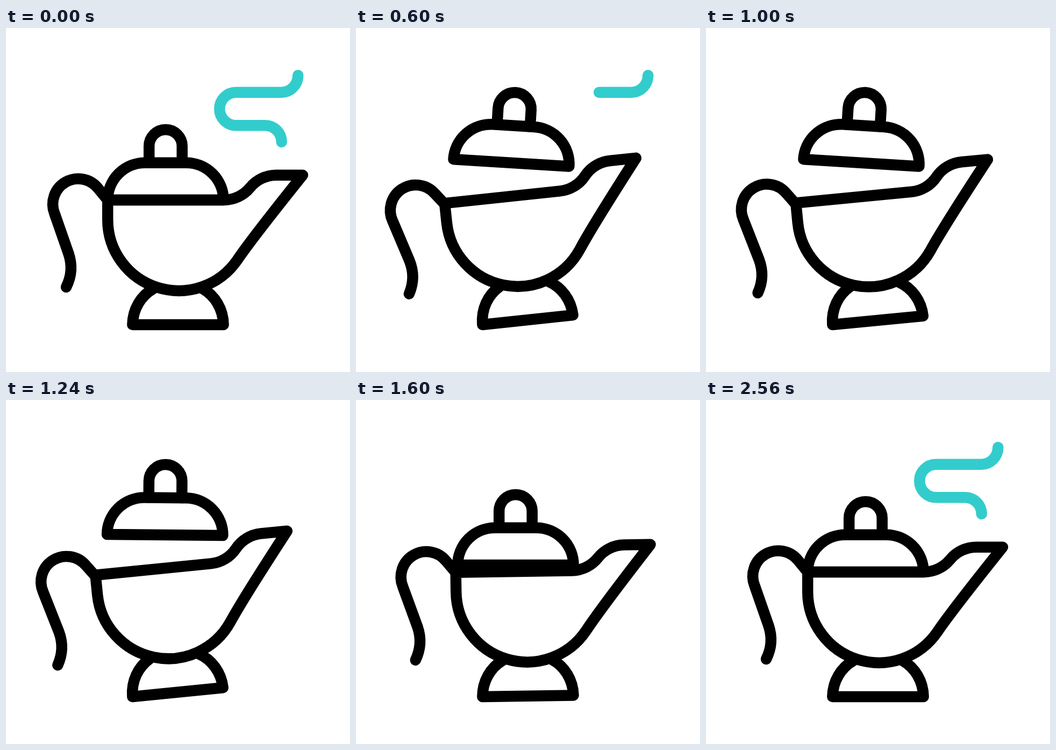
Write an HTML page with a canvas that moves like this. It is 640 by 640 pixels and loops after 3 s.

```html
<!DOCTYPE html>
<html lang="en">
<head>
<meta charset="utf-8">
<title>Lamp</title>
<style>
  html, body { margin: 0; width: 100%; height: 100%; overflow: hidden; background: #fff; }
  canvas { display: block; width: 640px; height: 640px; }
</style>
</head>
<body>
<canvas id="stage" width="640" height="640"></canvas>
<script>
const ctx = document.getElementById('stage').getContext('2d');
const LOOP = 3000, STEP = 40;
const INK = '#000', TEAL = '#33cccc';

const body = new Path2D(
  'M189.2 320 V357 A132.2 132.2 0 0 0 430 432 C447 407 482 361 552 273.7 ' +
  'H503 A63.3 63.3 0 0 0 454 297 A63.3 63.3 0 0 1 405 320 Z');
const foot = new Path2D('M274 485 C251 498 236 523 235.3 552 H404.6 C404 523 389 498 366 485');
const handle = new Path2D(
  'M189.2 320 L171.5 298.5 A47.3 47.3 0 0 0 90.3 345 L116.5 420 C123.5 441 121.5 463 112 482');
const lid = new Path2D(
  'M189.2 320 A69.3 69.3 0 0 1 258.5 250.7 H335.3 A69.3 69.3 0 0 1 404.6 320 Z');
const knob = new Path2D('M266.2 250.7 V219.7 A30.75 30.75 0 0 1 327.7 219.7 V250.7');
const smoke = new Path2D(
  'M512.7 212 A30.75 30.75 0 0 0 482 181.2 H428 A30.75 30.75 0 0 1 428 119.7 ' +
  'H512.5 A30.75 31.7 0 0 0 543.3 88');
const SMOKE_LENGTH = 332.6;

const clamp = (v, low, high) => Math.min(high, Math.max(low, v));
const progress = (t, from, to) => clamp((t - from) / (to - from), 0, 1);

// Eased 0 to 1 between two times.
function ramp(t, from, to) {
  const u = progress(t, from, to);
  return u * u * (3 - 2 * u);
}

// Up at one time, back down later.
const plateau = (t, up, top, fall, end) => ramp(t, up, top) - ramp(t, fall, end);
const hop = (t, from, to) => Math.sin(Math.PI * progress(t, from, to));

function potTilt(t) {
  const shake = 1 - Math.cos(Math.PI * (clamp(t, 720, 1040) - 720) / 80);
  return 7 * plateau(t, 200, 720, 1040, 1760) - 1.5 * shake;
}

const handleSway = t => 3.4 * plateau(t, 400, 720, 1240, 1640);

function lidTilt(t) {
  const swing = Math.cos(Math.PI * (clamp(t, 560, 1040) - 560) / 120);
  return 7 * swing * plateau(t, 440, 560, 1040, 1280);
}

function lidLift(t) {
  return 68.9 * plateau(t, 120, 430, 1240, 1480) + 13 * hop(t, 1480, 1720) + 8.6 * hop(t, 1720, 2080);
}

const smokeTail = t => ramp(t, 280, 800);
const smokeHead = t =>
  0.95 * ramp(t, 1760, 2030) - 0.095 * ramp(t, 2030, 2360) + 0.145 * ramp(t, 2360, 2560);

function turned(x, y, degrees, paint) {
  ctx.save();
  ctx.translate(x, y);
  ctx.rotate(degrees * Math.PI / 180);
  ctx.translate(-x, -y);
  paint();
  ctx.restore();
}

function drawPot(t) {
  turned(235.3, 552, -potTilt(t), () => {
    ctx.stroke(body);
    ctx.stroke(foot);
    turned(145, 325, handleSway(t), () => ctx.stroke(handle));
  });
}

function drawLid(t) {
  ctx.save();
  ctx.translate(0, -lidLift(t));
  turned(297, 189, lidTilt(t), () => {
    ctx.stroke(lid);
    ctx.stroke(knob);
  });
  ctx.restore();
}

function drawSmoke(from, to) {
  if (to - from < 0.001) return;
  ctx.save();
  ctx.strokeStyle = TEAL;
  ctx.setLineDash([(to - from) * SMOKE_LENGTH, 2 * SMOKE_LENGTH]);
  ctx.lineDashOffset = -from * SMOKE_LENGTH;
  ctx.stroke(smoke);
  ctx.restore();
}

function draw(t) {
  ctx.fillStyle = '#fff';
  ctx.fillRect(0, 0, 640, 640);
  ctx.strokeStyle = INK;
  ctx.lineWidth = 20.5;
  ctx.lineCap = ctx.lineJoin = 'round';
  drawPot(t);
  drawLid(t);
  if (t < 1000) drawSmoke(smokeTail(t), 1);
  else drawSmoke(0, smokeHead(t));
}

const start = performance.now();
function tick() {
  const t = (performance.now() - start) % LOOP;
  draw(Math.floor(t / STEP) * STEP);
  requestAnimationFrame(tick);
}
tick();
</script>
</body>
</html>
```
